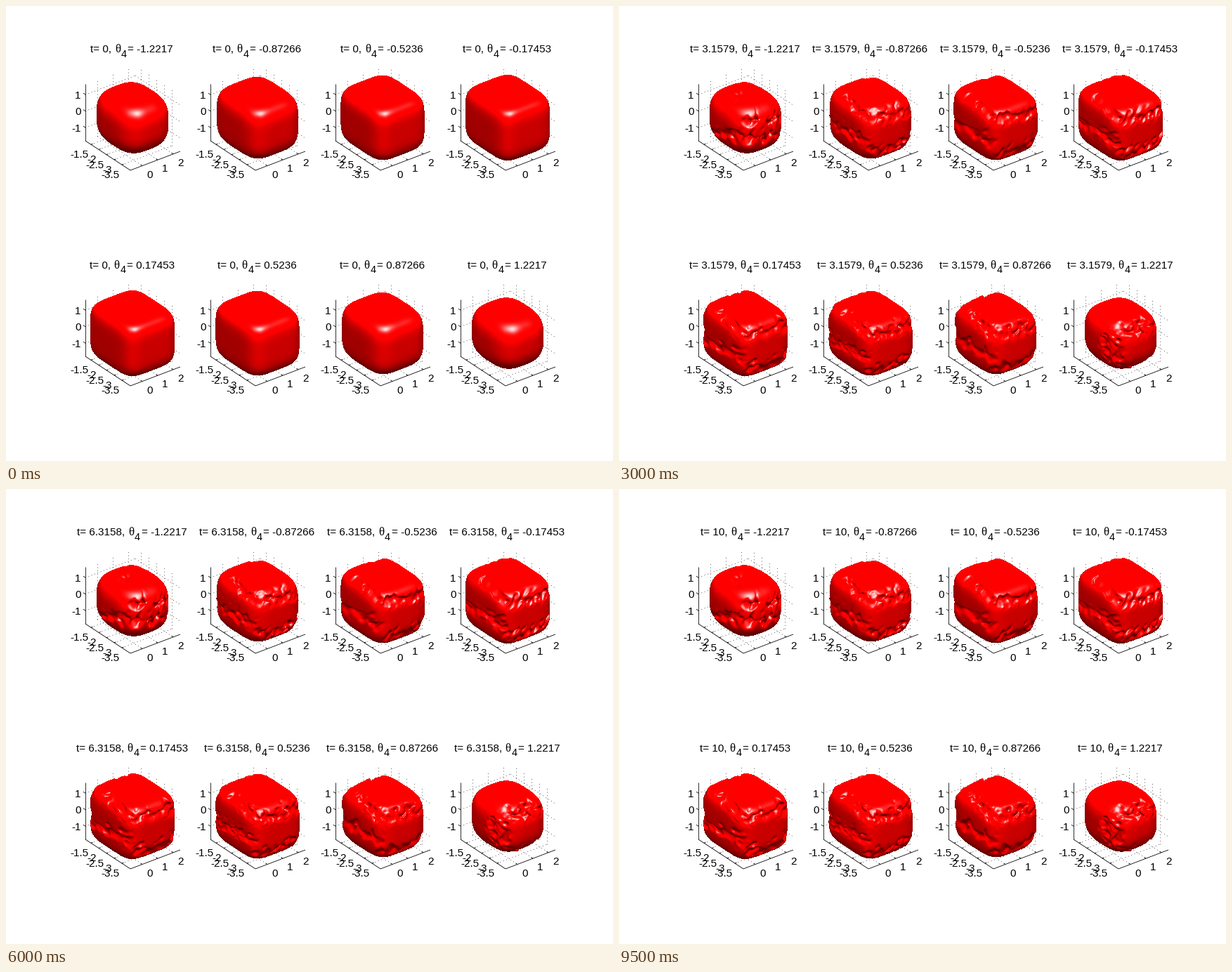
Recreate the animation shown at these times as a matplotlib script. Size 864 by 648 pixels, loop 10000 ms.

```python
import numpy as np
import matplotlib.pyplot as plt
from matplotlib.animation import FuncAnimation
from matplotlib.collections import LineCollection

WIDTH, HEIGHT = 864, 648
FRAMES, INTERVAL = 20, 500
FONT, SIZE = "Liberation Sans", 15.3
ANGLES = np.radians([-70, -50, -30, -10, 10, 30, 50, 70])
COLUMN, ROW = 178, 307
HALF = 65
DEPTH_STEP = 1.8
RADII = np.array([46.0, 53.7, 45.5])


def direction(az, el):
    az, el = np.radians([az, el])
    return np.array([np.sin(az) * np.cos(el), -np.cos(az) * np.cos(el), np.sin(el)])


VIEW = direction(-37.5, 30)
RIGHT = np.array([np.cos(np.radians(37.5)), -np.sin(np.radians(37.5)), 0])
UP = np.cross(VIEW, RIGHT)
CAMERA = np.array([RIGHT, UP, VIEW])
AMBIENT = 0.38
# direction in camera space, diffuse and specular strength
LIGHTS = [(CAMERA @ direction(0, 57), 0.55, 0.8),
          (CAMERA @ direction(-67.5, 60), 0.55, 0.4)]

# Cracks are segments in body coordinates running from -1 to 1
BOX_CRACKS = [
    ((-.85, -1, .70), (1, -.95, .50)),
    ((-.85, -1, -.62), (1, -.95, -.65)),
    ((-1, .9, -.20), (-1, -.9, -.08)),
    ((-.9, -.9, .75), (-.78, .2, .93)),
    ((.3, .9, .85), (.7, .9, .8)),
]
BACK_CRACKS = [
    ((-.9, .9, .78), (-.3, .93, .83)),
    ((-.9, .95, -.05), (-1, .8, -.1)),
]
FIRST_CRACKS = [
    ((-.75, -.8, .60), (.9, -.9, .10)),
    ((-.8, -.85, -.15), (.9, -.9, -.35)),
    ((-.9, .5, -.5), (-.85, -.7, 0)),
    ((-.4, -.1, .97), (-.1, .1, .99)),
    ((.7, .7, .7), (.9, .5, .65)),
]
LAST_CRACKS = [
    ((-.80, -.75, .70), (.9, -.85, .50)),
    ((-.9, -.7, .6), (-.75, -.8, -.85)),
    ((-.95, -.3, .3), (-.95, -.4, -.6)),
    ((-.5, -.85, -.8), (.5, -.8, -.8)),
]


def cracks_of(panel):
    if panel == 0:
        return FIRST_CRACKS
    if panel == 7:
        return LAST_CRACKS
    return BOX_CRACKS + (BACK_CRACKS if panel > 3 else [])


def ripple(points, rng):
    waves = rng.normal(0, 10, (6, 3)).astype(np.float32)
    phases = rng.uniform(0, 2 * np.pi, 6).astype(np.float32)
    return np.sin(points @ waves.T + phases).sum(axis=1) / 1.8


def segment_distance(points, start, end):
    start = np.array(start, dtype=np.float32)
    along = np.array(end, dtype=np.float32) - start
    offset = points - start
    share = np.clip(offset @ along / (along @ along), 0, 1)
    return np.linalg.norm(offset - share[:, None] * along, axis=1)


def build_body(panel):
    """Smooth body field plus a fast and a slow crack field on the view rays."""
    rank = min(panel, 7 - panel)
    power = (3, 4, 4.6, 4.8)[rank]
    half_width = (51.5, 58, 59.7, 60.2)[rank]
    dual = power / (power - 1)
    reach = (np.abs(RIGHT * RADII) ** dual).sum() ** (1 / dual)
    radii = RADII * half_width / reach

    across = np.arange(-HALF, HALF) + 0.5
    depth = np.arange(78, -46, -DEPTH_STEP)
    v, u, w = np.meshgrid(-across, across, depth, indexing="ij")
    grid = [((u * RIGHT[i] + v * UP[i] + w * VIEW[i]) / radii[i]).astype(np.float32)
            for i in range(3)]
    body = sum(np.abs(g) ** np.float32(power) for g in grid)
    body = body ** np.float32(1 / power) - 1

    shell = np.abs(body + 0.15) < 0.35
    points = np.stack([g[shell] for g in grid], axis=1)
    rng = np.random.default_rng(40 + panel)
    rough, pits = ripple(points, rng), ripple(points, rng)
    bent = points + 0.045 * np.stack([pits, rough, rough - pits], axis=1)
    near = np.min([segment_distance(bent, *c) for c in cracks_of(panel)], axis=0)

    fast, slow = np.zeros_like(body), np.zeros_like(body)
    fast[shell] = 0.14 * np.exp(-(near / 0.11) ** 2) * (0.65 + 0.4 * rough)
    slow[shell] = 0.12 * np.exp(-(near / 0.19) ** 2) * np.maximum(pits, 0)
    return body, fast, slow


def gradient(field, j, i, k):
    last = field.shape[2] - 1
    before, after = np.maximum(k - 1, 0), np.minimum(k + 1, last)
    return np.stack([
        (field[j, i + 1, k] - field[j, i - 1, k]) / 2,
        (field[j - 1, i, k] - field[j + 1, i, k]) / 2,
        (field[j, i, before] - field[j, i, after]) / (2 * DEPTH_STEP)], axis=1)


def shade(normal):
    red = np.full(len(normal), AMBIENT)
    white = np.zeros(len(normal))
    for light, diffuse, specular in LIGHTS:
        facing = normal @ light
        mirrored = 2 * facing * normal[:, 2] - light[2]
        red += diffuse * np.maximum(facing, 0)
        white += specular * np.where(facing > 0, np.maximum(mirrored, 0), 0) ** 10
    rgb = np.stack([red + white, white, white], axis=1)
    return np.clip(rgb, 0, 1)


def render_body(fields, t):
    body, fast, slow = fields
    field = (body + np.float32(1 - np.exp(-2.2 * t)) * fast
             + np.float32(1 - np.exp(-t / 2.5)) * slow)
    inside = field < 0
    first = inside.argmax(axis=2)
    seen = first > 0
    seen[[0, -1]] = False
    seen[:, [0, -1]] = False
    j, i = np.nonzero(seen)
    k = first[j, i]
    outer, inner = field[j, i, k - 1], field[j, i, k]
    share = (outer / (outer - inner))[:, None]
    normal = gradient(field, j, i, k - 1) * (1 - share) + gradient(field, j, i, k) * share
    normal /= np.linalg.norm(normal, axis=1, keepdims=True) + 1e-9
    tile = np.zeros((2 * HALF, 2 * HALF, 4), dtype=np.float32)
    tile[j, i, :3] = shade(normal)
    tile[j, i, 3] = 1
    return tile


fig = plt.figure(figsize=(WIDTH / 72, HEIGHT / 72), dpi=72, facecolor="white")
ax = fig.add_axes([0, 0, 1, 1])
ax.axis("off")


def label(x, y, text, ha="left", size=SIZE, font=FONT):
    return ax.text(x, y, text, ha=ha, va="baseline", fontsize=size, family=font)


def draw_axes(dx, dy):
    shift = np.array([dx, dy])
    left, front, right, back = (np.array(p) + shift for p in
                                [(113, 192), (177, 234), (248, 207), (184, 165)])
    rise = np.array([0, -81])
    x_step, y_step = right - front, front - left
    solid = [(left + rise, left), (left, front), (front, right)]
    dotted = []

    for n in range(3):
        move = x_step * (17 + 22 * n) / 71
        tick = front + move
        solid.append((tick, tick + (-2.5, -1.6)))
        dotted += [(left + move, tick), (left + move, left + move + rise)]
        label(tick[0] + 10.5, tick[1] + 17, str(n), "center")

    for n in range(5):
        move = y_step * (8 + 11 * n) / 64
        tick = left + move
        solid.append((tick, tick + (2.6, -1)))
        dotted += [(tick, back + move), (back + move, back + move + rise)]
        label(tick[0] - 3, tick[1] + 19, f"{-1.5 - n / 2:g}", "right")

    for value in (1, 0, -1):
        height = np.array([0, -42.3 - 23.5 * value])
        tick = left + height
        solid.append((tick, tick + (-3, -2)))
        dotted += [(tick, back + height), (back + height, right + height)]
        label(tick[0] - 6.5, tick[1] + 5.5, str(value), "right")

    ax.add_collection(LineCollection(dotted, colors="black", linewidths=0.6, zorder=1,
                                     linestyles=(0, (1.7, 6))))
    ax.add_collection(LineCollection(solid, colors="black", linewidths=0.8, zorder=3))


ADVANCE = {"=": 0.584, "-": 0.333, " ": 0.278, ",": 0.278, ".": 0.278, "t": 0.278}


def text_width(text):
    return SIZE * sum(ADVANCE.get(c, 0.556) for c in text)


class Title:
    THETA, INDEX = 9, 9.5

    def __init__(self, center, baseline, angle):
        self.center = center
        self.tail = f"= {angle:.5g}"
        self.parts = [label(0, baseline, ""),
                      label(0, baseline, "θ", font="Liberation Serif", size=17),
                      label(0, baseline + 6.5, "4", size=14.5),
                      label(0, baseline, self.tail)]

    def show(self, t):
        head = f"t= {t:.5g}, "
        widths = [text_width(head), self.THETA, self.INDEX, text_width(self.tail)]
        self.parts[0].set_text(head)
        x = self.center - sum(widths) / 2
        for part, width in zip(self.parts, widths):
            part.set_x(x)
            x += width


bodies = [build_body(panel) for panel in range(8)]
titles = []
for panel, angle in enumerate(ANGLES):
    dx, dy = panel % 4 * COLUMN, panel // 4 * ROW
    draw_axes(dx, dy)
    titles.append(Title(179.5 + dx, 66.5 + dy, angle))

canvas = np.zeros((HEIGHT, WIDTH, 4), dtype=np.float32)
picture = ax.imshow(canvas, extent=(0, WIDTH, HEIGHT, 0), interpolation="nearest",
                    aspect="auto", zorder=2)
ax.set_xlim(0, WIDTH)
ax.set_ylim(HEIGHT, 0)


def update(frame):
    t = 10 * frame / (FRAMES - 1)
    for panel, fields in enumerate(bodies):
        x = 180 + panel % 4 * COLUMN - HALF
        y = 159 + panel // 4 * ROW - HALF
        canvas[y:y + 2 * HALF, x:x + 2 * HALF] = render_body(fields, t)
        titles[panel].show(t)
    picture.set_data(canvas)
    return [picture]


animation = FuncAnimation(fig, update, frames=FRAMES, interval=INTERVAL,
                          repeat=True, repeat_delay=0, blit=False)
plt.show()
```
